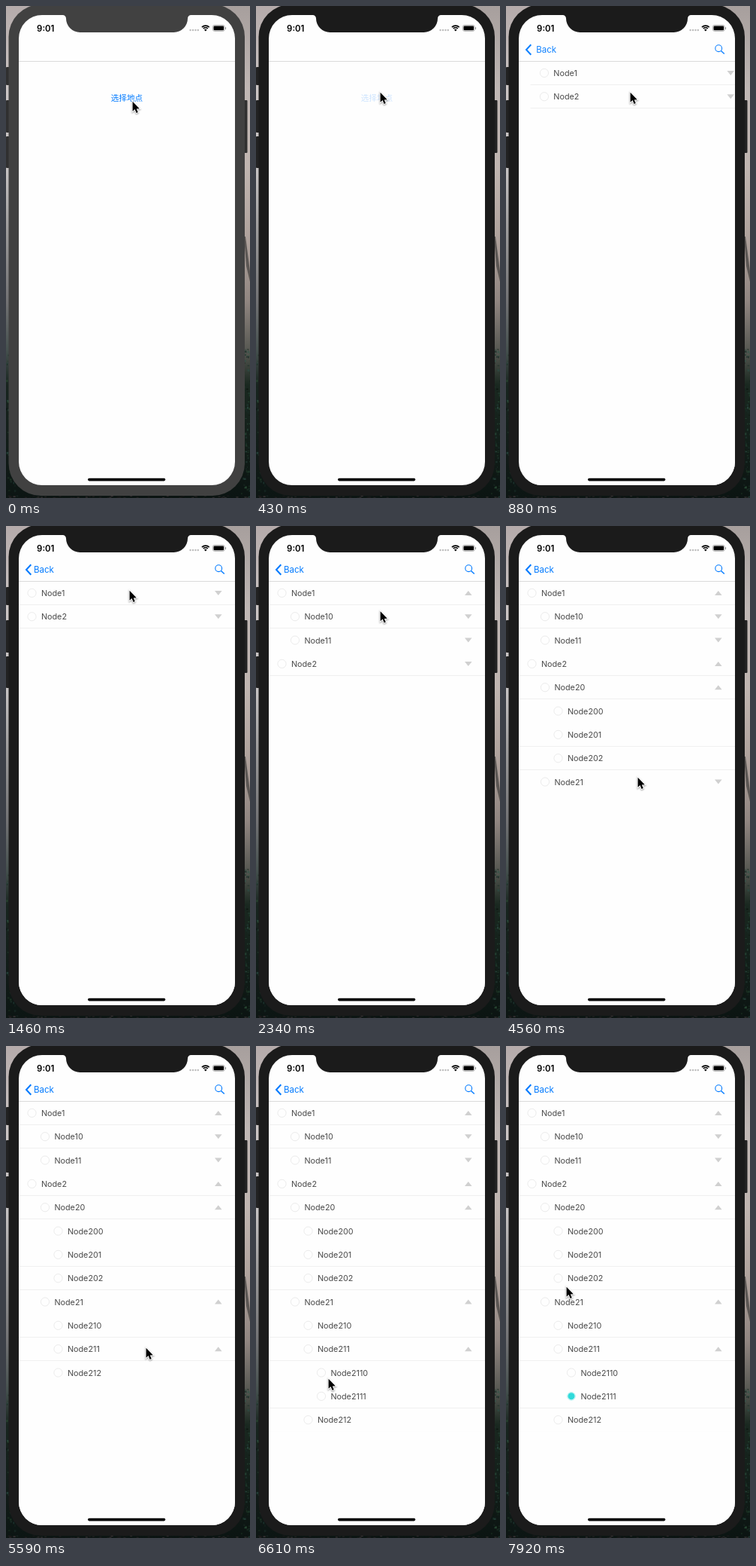
These frames come from a looping animation (325x653 px, 8000 ms). An HTML page with a canvas:

```html
<!DOCTYPE html>
<html lang="zh">
<head>
<meta charset="utf-8">
<style>
  html, body { margin: 0; width: 100%; height: 100%; overflow: hidden; }
  canvas { display: block; width: 100vw; height: 100vh; }
</style>
</head>
<body>
<canvas id="stage" width="325" height="653"></canvas>
<script>
const ctx = document.getElementById('stage').getContext('2d');
const LOOP = 8000, TICK = 146.8;
const BLUE = '#007aff', PAPER = '#fefefe', SANS = 'Inter, Roboto, sans-serif';
const SCREEN = { x: 17, y: 12, w: 288, h: 624, r: 31 };
const LIST_TOP = 73, ROW = 31.33, INDENT = 17.5;

// Ticks at which a node is tapped open; Infinity means it stays closed.
const openedAt = { 1: 12, 2: 18, 10: Infinity, 11: Infinity, 20: 24, 21: 33, 211: 38 };
const nodes = ['1', '10', '11', '2', '20', '200', '201', '202', '21', '210', '211', '2110', '2111', '212'];
const SELECTED = '2111', SELECT_TICK = 49, FOCUS_TICK = 2;

// Pointer keys: tick, x, y
const pointerKeys = [
  [0, 168, 126], [2, 165, 114], [7, 165, 114], [10, 164, 85], [15, 164, 85],
  [18, 168, 191], [20, 168, 192], [22, 170, 220], [26, 170, 220], [31, 175, 333],
  [35, 175, 333], [38, 186, 400], [40, 186, 400], [45, 96, 441], [46, 96, 441],
  [48, 88, 466], [50, 88, 466], [54, 80, 319]
];

const clamp = v => Math.min(1, Math.max(0, v));
const easeOut = v => 1 - (1 - clamp(v)) ** 3;
const smooth = v => { v = clamp(v); return v * v * (3 - 2 * v); };

function shape(points, color) {
  ctx.beginPath();
  points.forEach(([x, y]) => ctx.lineTo(x, y));
  ctx.closePath();
  ctx.fillStyle = color;
  ctx.fill();
}

function line(points, color, width) {
  ctx.beginPath();
  points.forEach(([x, y]) => ctx.lineTo(x, y));
  ctx.strokeStyle = color;
  ctx.lineWidth = width;
  ctx.stroke();
}

function circle(x, y, r, color, width) {
  ctx.beginPath();
  ctx.arc(x, y, r, 0, Math.PI * 2);
  if (width) {
    ctx.strokeStyle = color;
    ctx.lineWidth = width;
    ctx.stroke();
  } else {
    ctx.fillStyle = color;
    ctx.fill();
  }
}

function box(x, y, w, h, color, r = 0) {
  ctx.beginPath();
  ctx.roundRect(x, y, w, h, r);
  ctx.fillStyle = color;
  ctx.fill();
}

function text(string, x, y, font, color) {
  ctx.font = font;
  ctx.fillStyle = color;
  ctx.fillText(string, x, y);
}

function strip(x, w, colors) {
  const stops = [0, .17, .33, .46, .6, .7, .77, 1];
  const gradient = ctx.createLinearGradient(0, 0, 0, 653);
  colors.forEach((color, i) => gradient.addColorStop(stops[i], color));
  box(x, 0, w, 653, gradient);
}

function drawForest() {
  strip(0, 162, ['#b5abab', '#cbc5c4', '#c6c3c3', '#9b9a9a', '#727274', '#45504e', '#18251f', '#0c1513']);
  strip(162, 163, ['#a79f9d', '#c0b7b4', '#c0b5b0', '#b1a49e', '#918681', '#575852', '#1a2820', '#0b1412']);
  shape([[317, 306], [319, 306], [325, 352], [325, 366], [320, 345]], '#5c5754');
  let seed = 7;
  const random = () => (seed = seed * 16807 % 2147483647) / 2147483647;
  for (let i = 0; i < 260; i++) {
    const side = random() < .4 ? random() * 14 : 311 + random() * 14;
    const y = 455 + random() * 198;
    box(side, y, 1 + random() * 2, 1 + random() * 2, `hsla(${130 + random() * 40}, 28%, ${5 + random() * 22}%, .6)`);
  }
  for (let i = 0; i < 60; i++) {
    box(random() * 325, 649 + random() * 4, 3, 1.5, `hsla(340, 8%, ${8 + random() * 18}%, .6)`);
  }
}

function drawBezel(focused) {
  const button = focused ? '#222' : '#303030';
  [[81, 24], [125, 43], [173, 42]].forEach(([y, h]) => box(0, y, 5, h, button, 1));
  box(316, 125, 5.5, 70, button, 1);
  box(3.5, -2, 314.5, 652, focused ? '#1b1b1b' : '#414141', 43);
}

function drawNotch(color) {
  ctx.beginPath();
  ctx.moveTo(75, 11);
  ctx.lineTo(75, 12);
  ctx.arcTo(80, 12, 80, 17, 4.5);
  ctx.arcTo(80, 35, 100, 35, 18.5);
  ctx.arcTo(242, 35, 242, 17, 18.5);
  ctx.arcTo(242, 12, 247, 12, 4.5);
  ctx.lineTo(247, 11);
  ctx.fillStyle = color;
  ctx.fill();
}

function drawStatus() {
  text('9:01', 41.1, 33.7, `600 11.4px ${SANS}`, '#000');
  for (let i = 0; i < 4; i++) circle(245.6 + i * 3.4, 32, 1.2, '#bdbdbd');
  const arc = [-Math.PI * .75, -Math.PI * .25];
  ctx.strokeStyle = '#000';
  ctx.lineWidth = 1.6;
  [6.9, 4.3].forEach(r => {
    ctx.beginPath();
    ctx.arc(265.8, 33, r, ...arc);
    ctx.stroke();
  });
  ctx.beginPath();
  ctx.moveTo(265.8, 33.4);
  ctx.arc(265.8, 33.4, 2.6, ...arc);
  ctx.fillStyle = '#000';
  ctx.fill();
  ctx.beginPath();
  ctx.roundRect(275.4, 25.4, 15.8, 8, 2.3);
  ctx.strokeStyle = '#a0a0a0';
  ctx.lineWidth = .8;
  ctx.stroke();
  box(276.5, 26.5, 13.6, 5.8, '#000', 1.2);
  box(292, 28, 1.1, 3, '#a0a0a0', .5);
}

function drawNavItems(progress) {
  ctx.save();
  ctx.globalAlpha = progress;
  const shift = (1 - progress) * 60;
  line([[33.3, 51.3], [27, 58], [33.3, 64.7]], BLUE, 2);
  text('Back', 36.9 + shift, 62.2, `11.5px ${SANS}`, BLUE);
  circle(283.2, 56.2, 4.4, BLUE, 1.1);
  line([[286.4, 59.4], [290.8, 63.6]], BLUE, 1.4);
  ctx.restore();
}

// A child row becomes visible shortly after its parent is tapped.
function reveal(id, tick) {
  return id.length === 1 ? 1 : easeOut((tick - openedAt[id.slice(0, -1)] - .3) / 1.4);
}

function drawRow({ id, slot, alpha }, tick) {
  const top = LIST_TOP + ROW * slot, y = top + 15.9;
  const indent = (id.length - 1) * INDENT, cx = 34.5 + indent;
  const edge = Math.round(slot) + 1;
  ctx.save();
  ctx.globalAlpha = alpha;
  box(16, top, 289, ROW, PAPER);
  if (edge % 3 && edge < 14) box(16, Math.floor(LIST_TOP + .2 + ROW * (slot + 1)), 289, 1, '#f0f0f0');
  if (id === SELECTED && tick >= SELECT_TICK) {
    circle(cx, y, 5.4, '#a5eeee', .8);
    circle(cx, y, 4.6, '#30dada');
  } else {
    circle(cx, y, 5.6, '#e2e2e2', .7);
  }
  text('Node' + id, 46.9 + indent, y + 4, `10.8px ${SANS}`, '#4a4a4a');
  if (id in openedAt) {
    const flip = tick >= openedAt[id] ? -1 : 1;
    shape([[278, y - 3 * flip], [287.6, y - 3 * flip], [282.8, y + 3 * flip]], '#d0d0d0');
  }
  ctx.restore();
}

function drawList(tick) {
  let filled = 0;
  const rows = nodes.map(id => {
    const alpha = reveal(id, tick);
    filled += alpha;
    return { id, alpha, slot: filled - 1 };
  });
  // Bottom to top, so new rows slide out from beneath their parent.
  rows.reverse().filter(row => row.alpha > 0).forEach(row => drawRow(row, tick));
}

function drawScreen(tick) {
  const push = easeOut((tick - 4.4) / 2.6);
  ctx.save();
  ctx.beginPath();
  ctx.roundRect(SCREEN.x, SCREEN.y, SCREEN.w, SCREEN.h, SCREEN.r);
  ctx.clip();
  box(16, 12, 289, 624, PAPER);
  if (push < 1) {
    ctx.globalAlpha = tick === 3 || tick === 4 ? .2 : 1;
    text('选择地点', 139.7 - 87 * push, 126, '10.6px "Noto Sans CJK SC", "Noto Sans CJK", sans-serif', BLUE);
    ctx.globalAlpha = 1;
  }
  if (push > 0) {
    ctx.save();
    ctx.translate(289 * (1 - push), 0);
    box(16, 73, 289, 563, PAPER);
    drawList(tick);
    ctx.restore();
    drawNavItems(push);
  }
  box(16, 73, 289, 1, '#dadada');
  drawStatus();
  box(109, 626.8, 103.3, 3.6, '#000', 1.8);
  ctx.restore();
}

function drawPointer(tick) {
  const next = Math.max(1, pointerKeys.findIndex(key => key[0] >= tick));
  const [t0, x0, y0] = pointerKeys[next - 1], [t1, x1, y1] = pointerKeys[next];
  const p = smooth((tick - t0) / (t1 - t0));
  ctx.save();
  ctx.translate(x0 + (x1 - x0) * p + .6, y0 + (y1 - y0) * p + .8);
  const arrow = [[0, 0], [0, 13], [3, 10.3], [5, 15.1], [7.2, 14.2], [5.2, 9.6], [9.2, 9.4]];
  ctx.shadowColor = 'rgba(0,0,0,.4)';
  ctx.shadowBlur = 2;
  ctx.shadowOffsetY = 1;
  line([...arrow, arrow[0], arrow[1]], '#fff', 2);
  ctx.shadowColor = 'transparent';
  shape(arrow, '#000');
  ctx.restore();
}

function draw(now) {
  const tick = Math.min(54, Math.floor((now % LOOP + 11) / TICK));
  const focused = tick >= FOCUS_TICK;
  drawForest();
  drawBezel(focused);
  drawScreen(tick);
  drawNotch(focused ? '#1b1b1b' : '#414141');
  drawPointer(tick);
}

const start = performance.now();
function frame() {
  draw(performance.now() - start);
  requestAnimationFrame(frame);
}
frame();
</script>
</body>
</html>
```
